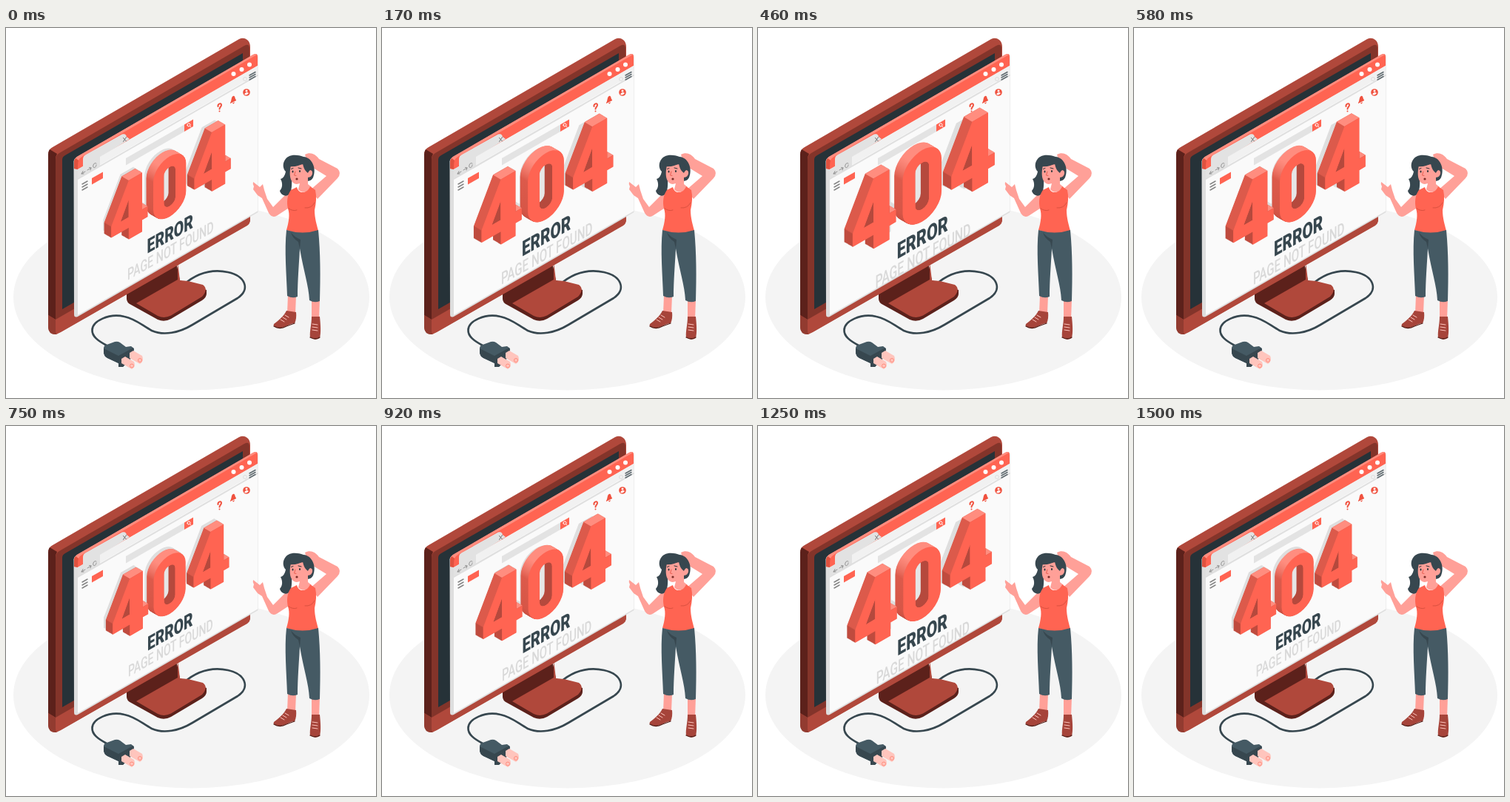
Recreate the animation shown at these times as an HTML page. Size 500x500 px, loop 1.54 s.

```html
<!DOCTYPE html>
<html lang="en">
<head>
<meta charset="utf-8">
<title>404</title>
<style>
@property --u { syntax: "<number>"; inherits: true; initial-value: 0.11; }
html, body { margin: 0; width: 100%; height: 100%; overflow: hidden; background: #fff; }
svg { display: block; width: 100vw; height: 100vh; animation: pulse 1540ms linear infinite; }
@keyframes pulse {
  0%, 100% { --u: .11 }
  9.74% { --u: .36 }
  21.43% { --u: .93 }
  23.7% { --u: 1 }
  31.17% { --u: .63 }
  37.66% { --u: .44 }
  48.4% { --u: .02 }
  59.74% { --u: .33 }
  70.13% { --u: .92 }
  73.05% { --u: 1 }
  81.17% { --u: .556 }
  97.4% { --u: .04 }
  98.05% { --u: .03 }
}
.digits { transform-origin: 218px 218px; transform: scale(calc(.762 + .256 * var(--u))); }
.words { transform-origin: 217px 236px; transform: scale(calc(.849 + .162 * var(--u))); }
.shade { transform-origin: 218px 218px; transform: translate(-3px, -3px) scale(calc(.765 + .09 * var(--u))); }
text { font-family: Roboto, Arial, sans-serif; }
.line { fill: none; stroke-linecap: round; stroke-linejoin: round; }
</style>
</head>
<body>
<svg viewBox="0 0 500 500">
  <defs>
    <path id="four" d="M0 -20V-39L30 -101H53V-38H62.500V-20H53V0H30V-20Z"/>
    <path id="four-hole" d="M30 -38V-68L16 -38Z"/>
    <path id="four-top" d="M30 -101H53L41 -114.900H18ZM53 -38H62.500L53 -49Z"/>
    <path id="zero" d="M0 -74A28 28 0 0 1 56 -74V-27A28 28 0 0 1 0 -27Z"/>
    <path id="zero-hole" d="M18 -74A10 10 0 0 1 38 -74V-27A10 10 0 0 1 18 -27Z"/>
    <clipPath id="four-clip"><use href="#four-hole"/></clipPath>
    <clipPath id="zero-clip"><use href="#zero-hole"/></clipPath>
    <linearGradient id="four-side" gradientUnits="userSpaceOnUse" x1="0" y1="-101" x2="0" y2="0">
      <stop offset=".61" stop-color="#dc5a4b"/><stop offset=".62" stop-color="#bf4b3e"/>
    </linearGradient>
    <linearGradient id="zero-side" gradientUnits="userSpaceOnUse" x1="0" y1="-102" x2="0" y2="0">
      <stop offset=".06" stop-color="#ff8d7f"/><stop offset=".28" stop-color="#dc5a4b"/>
      <stop offset=".75" stop-color="#d65647"/><stop offset="1" stop-color="#bf4b3e"/>
    </linearGradient>
  </defs>

  <ellipse cx="250.500" cy="363.500" rx="240.500" ry="126" fill="#f4f4f4"/>

  <!-- cable and plug -->
  <path class="line" stroke="#37474f" stroke-width="2.700" d="M240 347C257 332 276 325 300 330C323 335 331 353 313 365L252 401C234 412 213 416 197 409C184 402 175 393 160 390C139 385 117 396 116.500 408C116 417 125 423 136 429"/>
  <path fill="#455a64" d="M132 433Q132 429 136 428L147 424Q151 423 154 425L162 431L169 430L173 433V442L158 458H152V453L137 446Q132 443 132 438Z"/>
  <path fill="#37474f" d="M132 433L152 443V458V453L137 446Q132 443 132 438ZM152 443L172 432V443L158 458H152Z"/>
  <g fill="#ffc5bd">
    <path d="M156 447L161 444L173 451Q176 458 170 461L156 453Z"/>
    <path d="M167 439L172 436L184 443Q187 450 181 454L167 446Z"/>
  </g>
  <g fill="none" stroke="#ff8d7e"><circle cx="170" cy="456.500" r="2.500"/><circle cx="181" cy="449" r="2.500"/></g>

  <!-- stand -->
  <path fill="#5c211b" d="M163 355L230 316L235 341L271 354V359Q271 364 265 368L223 393Q214 398 205 394L169 374Q163 371 163 366Z"/>
  <path fill="#b0483b" d="M232 316L235 341L246 342L266 347Q274 353 265 363L223 388.500Q214 393 205 389L176 372L232 340Z"/>

  <!-- monitor -->
  <path fill="#b0483b" d="M57 171Q57 164 63 161L315 15Q321 12 326 16Q330 19 330 26V259Q330 264 326 267L72 412Q66 416 61 412Q57 409 57 404Z"/>
  <path fill="#5c211b" d="M57 171Q57 167 59 164L69 170Q67 173 67 178V394L57 388Z"/>
  <path fill="#923b30" d="M57 388L67 394V408Q67 413 69 414Q57 415 57 404Z"/>
  <path fill="#83342a" d="M67 178Q67 172 72 169L322 24Q329 20 329 28V258L67 408Z"/>
  <path fill="#b0483b" d="M67 394L330 242V260Q329 265 325 267L74 411Q67 414 67 408Z"/>
  <path fill="#263238" d="M76 178Q76 174 80 172L320 34V240L76 380Z"/>

  <!-- browser window -->
  <path fill="#dedede" d="M91.500 182Q91 177 96 174L335 36Q340 33 340.500 39V249L97 390Q92 392 92 387Z"/>
  <path fill="#fafafa" d="M97 190L340 50V247.500L97 388Z"/>
  <path fill="#ff6452" d="M92 182Q92 177 96 174L334 36Q340 33 340 39V51L97 191L92 190Z"/>
  <path fill="#ff8d7f" d="M94 176L96 174L334 36Q337 34 339 36L104 173Q100 175 98 179Z"/>
  <path fill="#e0523f" d="M92 182Q92 178 94 176L98 179Q97 181 97 191L92 190Z"/>
  <path fill="#e2e2e2" d="M97 191L104 187V177Q104 173 108 171L157 143.500Q162 142 163 147L167 150L127 175V187L97 204Z"/>
  <path fill="#f1f1f1" d="M127 174L340 51V62L127 185Z"/>
  <path class="line" stroke="#dfdfdf" stroke-width="2" d="M97 204L340 64"/>
  <path class="line" stroke="#666" stroke-width=".9" d="M158.500 148.500L162.500 153M162.500 147.500L158.500 153.500"/>
  <path class="line" stroke="#8a8a8a" stroke-width=".9" d="M102 197L107 194M104 193.500L102 197L105 197M110 192L115 189M112.500 188.500L115 189L114 192M122 183C119 181 117 186 118 188C120 190 122 187 122 185"/>
  <g fill="#fff"><circle cx="307.500" cy="62" r="3"/><circle cx="318.500" cy="56" r="3"/><circle cx="329" cy="49.500" r="3"/></g>
  <circle cx="323" cy="69" r="2.500" fill="none" stroke="#ddd"/>
  <path class="line" stroke="#606b70" stroke-width="1.500" d="M329 64L337 59.500M329 67L337 62.500M329 70L337 65.500"/>
  <path class="line" stroke="#858585" stroke-width="1.500" d="M103 211L110 207M103 215L110 211M103 219L110 215"/>
  <path fill="#ff6452" d="M116 203L131 194.500V203L116 211.500Z"/>
  <path fill="#e3e3e3" d="M162 176L241 130.500V140L162 185.500Z"/>
  <path fill="#ff6452" d="M241 130.500L253 123.500V133L241 140Z"/>
  <path class="line" stroke="#fff" stroke-width="1" d="M245 131.500a2 2 0 1 1 4 -1a2 2 0 1 1 -4 1M248.500 132.500L250 134"/>
  <path class="line" stroke="#f0523f" stroke-width="2" d="M286.500 106C286 102 291 101 291 104C291 107 288.500 106.500 288.500 109.500M288.500 112.500V112.600"/>
  <path fill="#f0523f" d="M303 101C305 99 304 93 307 92C310 91 309 96 311 97L311 98L303 102ZM306 101.500L309 100Q308 104 306 101.500Z"/>
  <circle cx="325" cy="87" r="4.800" fill="#f0523f"/>
  <path fill="#fff" d="M323.500 85a1.500 1.500 0 1 1 3 0a1.500 1.500 0 1 1 -3 0M322 89.500Q325 85.500 328 88Q325 92 322 89.500Z"/>

  <g class="shade" id="shade"></g>
  <g class="words">
    <text transform="matrix(.66 -.372 0 1 156 357)" font-size="25" font-weight="500" fill="#d9d9d9">PAGE NOT FOUND</text>
    <text transform="matrix(.725 -.41 0 1 186.500 315.500)" font-size="31" font-weight="800" fill="#37474f">ERROR</text>
  </g>
  <g class="digits" id="digits"></g>

  <!-- woman -->
  <g fill="#ffa098">
    <path d="M381 361L392 362L391 386L380 386Z"/>
    <path d="M413 367L424 367L423 394L413 394Z"/>
    <path d="M386 218Q381 220 378 225L361 242L353 231L349 219L347 211L343 215L334 208Q333 211 335 214L334 218L340 226L346 230L355 250Q360 258 367 253L387 240Z"/>
    <path d="M404 171C411 167 418 170 423 177L448 190Q454 196 448 203L421 231L411 219L433 200L415 189L407 181Z"/>
  </g>
  <path fill="#37474f" d="M376 180C380 171 391 170 402 174C414 175 420 190 415 202C412 208 406 207 404 206L388 199C384 207 389 217 382 225C378 229 371 225 370 220C374 216 374 209 371 204C375 203 377 199 378 194C374 190 374 184 376 180Z"/>
  <path fill="#ffa098" d="M385 186C382 199 384 210 393 211L397 210L395 218C400 225 409 221 413 215L408 211V202C415 202 416 192 411 192L408 195L403 184Z"/>
  <path fill="#37474f" d="M383 187C390 188 397 186 401 183C402 189 404 193 408 196L411 188L402 176L385 178Z"/>
  <g fill="#263238"><ellipse cx="387.500" cy="194" rx="1" ry="1.500"/><ellipse cx="397" cy="193.500" rx="1" ry="1.500"/></g>
  <path class="line" stroke="#263238" stroke-width="1" d="M385.500 190.500L388 189.500M395 189L399 190"/>
  <path class="line" stroke="#e76153" stroke-width="1" d="M391 194L389.500 199L392 199.500"/>
  <ellipse cx="393" cy="204" rx="1.600" ry="1.500" fill="#7c2d28"/>
  <path fill="#ff6452" d="M385 219L393 215C396 226 408 223 411 214L418 219C420 228 419 237 417 246C417 257 420 266 422 274C409 279 391 278 379 273C382 263 384 252 381 244C379 235 380 226 385 219Z"/>
  <path class="line" stroke="#d9503f" stroke-width="1" d="M417 236Q413 244 404 243M382 244Q388 248 393 246"/>
  <path fill="#455a64" d="M379 273C376 300 379 333 380 362Q387 366 394 363C394 342 396 318 397 298C402 328 409 348 410 368Q417 372 424 369C425 336 425 305 422 273Q401 280 379 273Z"/>
  <path fill="#37474f" d="M385 276Q389 282 398 286L397 298L395 289Q387 284 385 276Z"/>
  <g fill="#a6443a">
    <path d="M379 382L392 384Q393 393 390 399C382 399 376 407 367 405Q360 404 362 400C367 396 375 390 379 382Z"/>
    <path d="M413 390H424C425 400 426 411 424 419Q418 423 411 418C410 410 413 401 413 390Z"/>
  </g>
  <path class="line" stroke="#552019" stroke-width="1.300" d="M362 403Q370 408 379 403L390 399M411 418Q418 422 424 418"/>
  <path class="line" stroke="#ffc5bd" stroke-width="1" d="M374 391L379 394M377 388L382 391M371 394L376 397M414 400L421 401M414 404L421 405M414 408L421 409"/>
</svg>
<script>
const NS = "http://www.w3.org/2000/svg";
const DEPTH = [-12, -13.9];
const glyphs = [["four", 264, 239], ["zero", 194, 279.8], ["four", 122, 321]];

function add(parent, tag, attrs) {
  const el = document.createElementNS(NS, tag);
  for (const key in attrs) el.setAttribute(key, attrs[key]);
  return parent.appendChild(el);
}

function shape(parent, name, fill, k = 0) {
  return add(parent, "use", {
    href: "#" + name, fill,
    transform: `translate(${DEPTH[0] * k} ${DEPTH[1] * k})`
  });
}

// Each glyph lies on the slanted plane of the screen and is extruded towards the viewer.
function plane(parent, x, y) {
  return add(parent, "g", { transform: `matrix(1 -.577 0 1 ${x} ${y})` });
}

for (const [name, x, y] of glyphs) {
  const shade = plane(document.getElementById("shade"), x, y);
  for (let i = 8; i >= 0; i--) shape(shade, name, "#dedede", i / 8);

  const solid = plane(document.getElementById("digits"), x, y);
  for (let i = 24; i > 0; i--) shape(solid, name, `url(#${name}-side)`, i / 24);
  if (name === "four") shape(solid, "four-top", "#ff8d7f");
  shape(solid, name, "#ff6452");

  const hole = add(solid, "g", { "clip-path": `url(#${name}-clip)` });
  shape(hole, name + "-hole", "#b5493d");
  shape(hole, name + "-hole", "#e6e6e6", 1);
}
</script>
</body>
</html>
```
